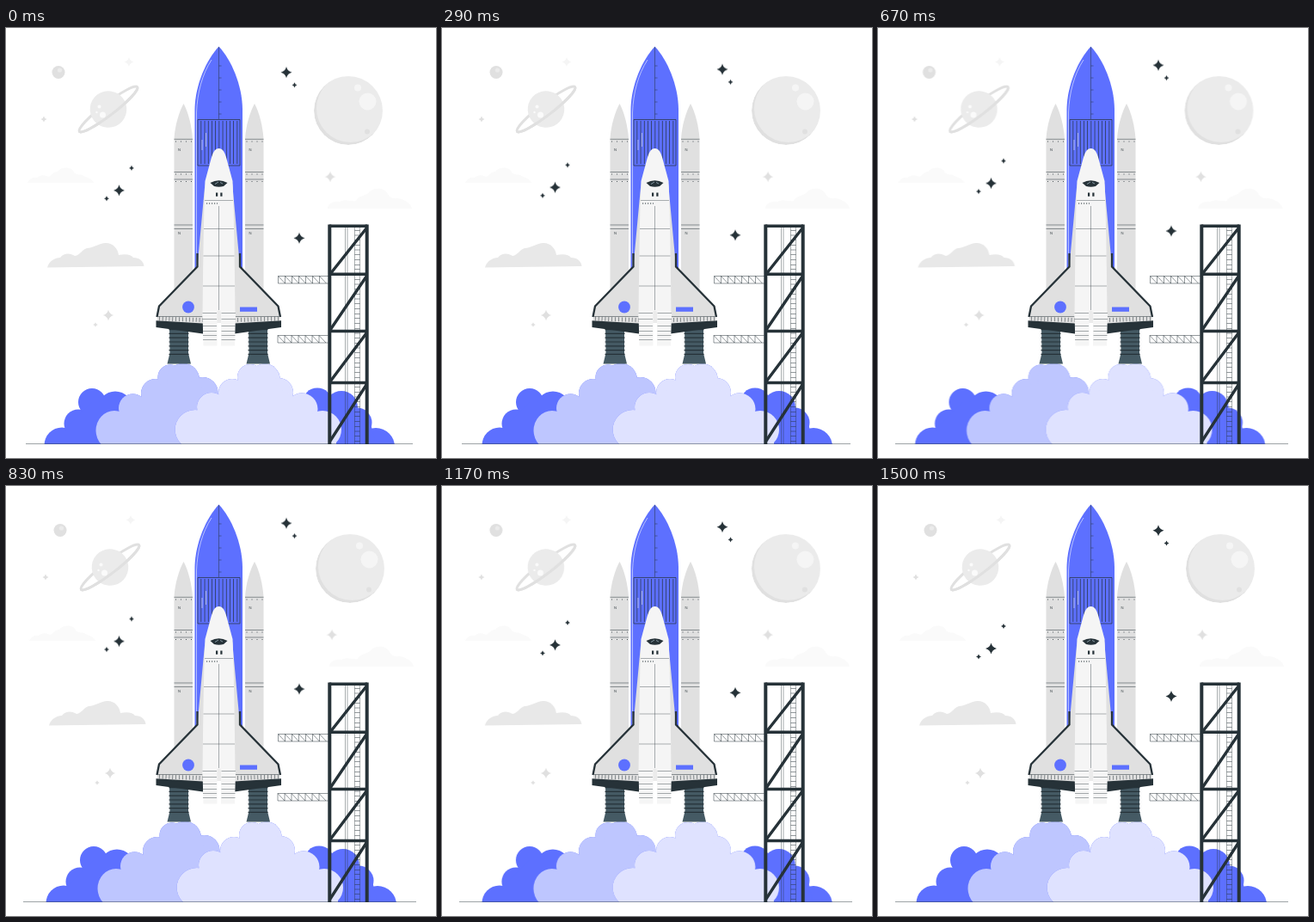
Recreate the animation shown at these times as an HTML page. Size 500 by 500 pixels, loop 1540 ms.

```html
<!DOCTYPE html>
<html lang="en">
<head>
<meta charset="utf-8">
<title>Rocket launch</title>
<style>
  html, body { margin: 0; width: 100%; height: 100%; overflow: hidden; background: #fff; }
  svg { display: block; width: 100vw; height: 100vh; }
  :root { --blue: #5d70ff; --ink: #263238; }
  .blue { fill: var(--blue); }
  .ink { fill: var(--ink); }
  .g1 { fill: #e0e0e0; }
  .g2 { fill: #ebebeb; }
  .g3 { fill: #f5f5f5; }
  .g4 { fill: #fafafa; }
  .line { fill: none; stroke: var(--ink); }
  .shake { animation: shake 1540ms cubic-bezier(.36, .07, .19, .97) infinite; }
  .float { animation: float 1540ms linear infinite; }
  .ground { animation: ground 1540ms step-end infinite; }

  /* 1.5 s of motion, then a short rest */
  @keyframes shake {
    0%, 97.4%, 100% { transform: translateX(0); }
    9.74%, 87.66% { transform: translateX(-1px); }
    19.48%, 77.92% { transform: translateX(2px); }
    29.22%, 48.7%, 68.18% { transform: translateX(-3px); }
    38.96%, 58.44% { transform: translateX(3px); }
  }
  @keyframes float {
    0%, 97.4%, 100% { transform: translateY(0); }
    48.7% { transform: translateY(-9.5px); }
  }
  @keyframes ground {
    0% { clip-path: inset(0 4px 0 3px); }
    17% { clip-path: inset(0 2px 0 3px); }
    26% { clip-path: inset(0 2px 0 0); }
    37%, 100% { clip-path: inset(0); }
  }
</style>
</head>
<body>
<svg viewBox="0 0 500 500" stroke-width=".5">
  <defs>
    <path id="star" d="M0 -1Q.2 -.2 1 0Q.2 .2 0 1Q-.2 .2 -1 0Q-.2 -.2 0 -1Z"/>
    <clipPath id="sky"><path d="M0 0H500V483.8H0Z"/></clipPath>
    <clipPath id="disc"><circle cx="398" cy="96" r="40"/></clipPath>

    <g id="puffL">
      <ellipse cx="126" cy="468" rx="21.5" ry="23"/>
      <circle cx="147.5" cy="442" r="16.5"/>
      <circle cx="174" cy="425" r="17"/>
      <circle cx="191" cy="406" r="14.5"/>
      <circle cx="206" cy="409" r="19"/>
      <circle cx="228.5" cy="424" r="18"/>
      <path d="M112 484V470L145 440L175 415H225L246 430V484Z"/>
    </g>
    <g id="puffR">
      <ellipse cx="220" cy="467" rx="23.5" ry="23"/>
      <circle cx="239" cy="441" r="17"/>
      <circle cx="263" cy="424" r="16"/>
      <circle cx="284" cy="406" r="15"/>
      <circle cx="301" cy="408" r="17.5"/>
      <circle cx="317" cy="424" r="17"/>
      <circle cx="344" cy="443" r="18.5"/>
      <ellipse cx="368" cy="467" rx="22" ry="22"/>
      <path d="M204 484V470L240 435L270 412H310L340 435L384 470V484Z"/>
    </g>

    <g id="truss" class="line">
      <path d="M316.5 288.5H375M316.5 297H375M316.5 288.5V297"/>
      <path d="M316.500 288.500l8 8.500v-8.500l8 8.500v-8.500l8 8.500v-8.500l8 8.500v-8.500l8 8.500v-8.500l8 8.500v-8.500l8 8.500"/>
    </g>

    <g id="booster">
      <path class="g1" d="M206.5 88C201 98 196.300 114 195.500 129V305H217V129C216 114 212 98 206.500 88Z"/>
      <path class="line" d="M195.500 129.300H217M195.500 167.500H217M195.500 176H217M195.500 229H217M195.500 233.500H217"/>
      <path class="line" d="M197 132H216M197 170H216M197 178.500H216" stroke-dasharray="1 5" stroke-width=".8"/>
      <path class="line" d="M200.500 143v-3l2 3v-3M200.500 240v-3l2 3v-3" stroke-opacity=".7"/>
    </g>

    <g id="nozzle">
      <path fill="#455a64" d="M190 346H212V378L215 390.500H187.500L190.500 378Z"/>
      <path class="line" d="M201 350V380" stroke-width="23" stroke-dasharray="1.200 3.600"/>
    </g>

    <g id="wing">
      <path class="g1" d="M231.500 180L222.500 277L178 324L175.500 340L230 346Z"/>
      <path class="line" d="M222.500 262V277.500L178 323.500L175.500 336" stroke-width="2.300"/>
      <path class="line" d="M177 335.500H229"/>
      <path class="line" d="M178 338L229 339.500" stroke-width="5" stroke-dasharray=".5 3.400"/>
      <path class="ink" d="M174.500 340.300L229 343.500V355.500L174.500 348Z"/>
    </g>

    <g id="pod">
      <path class="g3" d="M228.500 331H245.500V369.500H229.500Z"/>
      <path class="line" d="M228.500 331.500H245M228.500 338.500H245M229 346.500H245M229 352.500H245M229 357.500H245M229 362.500H245" stroke-opacity=".8"/>
    </g>
  </defs>

  <g class="shake">
    <circle class="g1" cx="61" cy="51.500" r="7.500"/>
    <circle class="g2" cx="62.500" cy="49" r="2.600"/>

    <g transform="rotate(-37.500 119 94.500)" fill="none" stroke="#e0e0e0" stroke-width="3">
      <ellipse cx="119" cy="94.500" rx="42.500" ry="7"/>
      <circle cx="119" cy="94.500" r="21.300" fill="#ebebeb" stroke="none"/>
      <path d="M76.500 94.500A42.500 7 0 0 0 161.500 94.500"/>
    </g>
    <g class="g4">
      <circle cx="108.500" cy="91.500" r="2"/>
      <circle cx="112.500" cy="101" r="3.500"/>
      <circle cx="105.500" cy="98" r="1.200"/>
    </g>

    <g clip-path="url(#disc)">
      <circle class="g1" cx="398" cy="96" r="40"/>
      <circle class="g2" cx="400.500" cy="93.500" r="39.500"/>
      <circle class="g3" cx="420.500" cy="85.500" r="10"/>
      <circle class="g3" cx="409" cy="69.500" r="4"/>
      <circle class="g1" cx="420" cy="120.500" r="3"/>
    </g>

    <path class="g4" d="M25 180C27 176 31 173 36 174C40 170 46 171 49 173C53 172 54 167 60 167C64 161 77 161 79 168C82 171 86 170 89 171C92 174 100 174 102 180Z"/>
    <path class="g4" d="M374 210C374 203 383 201 388 202C394 198 402 202 407 201C410 194 417 196 421 192C427 185 440 185 444 193C446 197 450 199 455 198C463 199 470 203 472 210Z"/>
    <path fill="#e8e8e8" d="M48 278.500C50 271 57 267 63 267C68 261 75 262 80 265C86 264 88 258 94 256C102 256 108 250 116 250C125 250 130 257 131 264C140 262 146 264 148 267C155 267 160 271 160.500 277Z"/>

    <g class="g1">
      <use href="#star" transform="translate(119 334) scale(6.300)"/>
      <use href="#star" transform="translate(104 345) scale(2.800)"/>
      <use href="#star" transform="translate(377 173) scale(6.300)"/>
      <use href="#star" transform="translate(44 106) scale(3.600)"/>
      <use href="#star" class="g3" transform="translate(143 39.500) scale(5.500)"/>
    </g>

    <g clip-path="url(#sky)">
      <g class="blue">
        <circle cx="65" cy="485" r="20.500"/>
        <circle cx="84" cy="460" r="16.500"/>
        <circle cx="100" cy="435" r="16"/>
        <circle cx="127" cy="443" r="20.500"/>
        <path d="M70 484V465L100 435L150 435V484Z"/>
        <circle cx="362" cy="436" r="17.500"/>
        <circle cx="390" cy="441" r="19"/>
        <circle cx="408" cy="459" r="17.500"/>
        <circle cx="430" cy="487" r="22"/>
        <path d="M350 484V440H400L424 460L430 484Z"/>
      </g>
      <use href="#puffL" fill="#5d70ff"/>
      <use href="#puffL" fill="#bec6ff"/>
      <use href="#puffR" fill="#5d70ff"/>
      <use href="#puffR" fill="#dfe2ff"/>
    </g>
  </g>

  <rect class="ground ink" x="20" y="483.200" width="457" height=".6" opacity=".75"/>

  <g class="float ink">
    <use href="#star" transform="translate(131.500 189.100) scale(6.500)"/>
    <use href="#star" transform="translate(146 163) scale(3)"/>
    <use href="#star" transform="translate(117 198.500) scale(3)"/>
    <use href="#star" transform="translate(326 51.700) scale(6.500)"/>
    <use href="#star" transform="translate(335.500 66.500) scale(3)"/>
    <use href="#star" transform="translate(341 244.500) scale(6.500)"/>
  </g>

  <!-- tank -->
  <path class="blue" d="M247.500 21.500C262 37 274.500 66 275 94V290H219.500V94C220 66 233 37 247.500 21.500Z"/>
  <path d="M239 37C228 54 222.500 75 221.500 98V278" fill="none" stroke="#dfe2ff" stroke-width=".7"/>
  <path class="line" d="M247.500 22V106M247.500 44h3M247.500 58h3M247.500 72h3M247.500 86h3M247.500 100h3"/>
  <path class="line" d="M223 106.500H272V160H223Z" stroke-width=".7"/>
  <path class="line" d="M226.500 133H271" stroke-width="50" stroke-dasharray=".7 3.500"/>
  <path d="M228 130V142M232.500 122V138" fill="none" stroke="#bec6ff" stroke-width=".9"/>

  <use href="#booster"/>
  <use href="#booster" x="82.500"/>
  <use href="#nozzle"/>
  <use href="#nozzle" x="92"/>

  <!-- orbiter -->
  <use href="#wing"/>
  <use href="#wing" transform="matrix(-1 0 0 1 494.500 0)"/>
  <path class="g3" d="M247.500 140C242.500 140 240.500 145 238.500 152L231.500 178C230 205 229 290 228.500 336H266.500C266 290 265 205 263.500 178L256.500 152C254.500 145 252.500 140 247.500 140Z"/>
  <path class="line" d="M231 200.500H264M247.500 207V328M230 233.500H265M229.500 265H265.500M229 300H266" stroke-opacity=".75"/>
  <path class="line" d="M233 204H246" stroke-width="1.200" stroke-dasharray="1.200 1.800"/>
  <path class="ink" d="M237.500 180Q247.500 174.500 257.500 180L253 184Q247.500 185.500 242 184Z"/>
  <path d="M243 181.500l4 -2.500M249 179.500l3 1.500" stroke="#90a4ae" stroke-width=".9"/>
  <path class="ink" d="M244 191.500h2.200v4.200h-2.200ZM249.300 191.500h2.200v4.200h-2.200Z"/>
  <path class="g2" d="M245 343V331Q247.500 326 250 331V343Z"/>
  <use href="#pod"/>
  <use href="#pod" transform="matrix(-1 0 0 1 495.500 0)"/>
  <circle class="blue" cx="212" cy="324.500" r="6.900"/>
  <path class="blue" d="M272 324.500H292V329.800H272Z"/>

  <!-- tower -->
  <use href="#truss"/>
  <use href="#truss" x="-.5" y="69"/>
  <path class="line" d="M394.500 232V484M397 232V484M405.500 232V484M411.500 232V484" stroke-opacity=".8"/>
  <path class="line" d="M408.500 235V484" stroke-width="6" stroke-dasharray=".5 5.200"/>
  <path class="line" d="M376.300 228.500V484M419.700 228.500V484" stroke-width="4"/>
  <path class="line" d="M376 230.300H420M376 286.300H420M376 352.500H420M376 412.500H420M419 233L377 286M419 289L377 351M419 355L377 411M419 415L377 480" stroke-width="3.400"/>
</svg>
</body>
</html>
```
